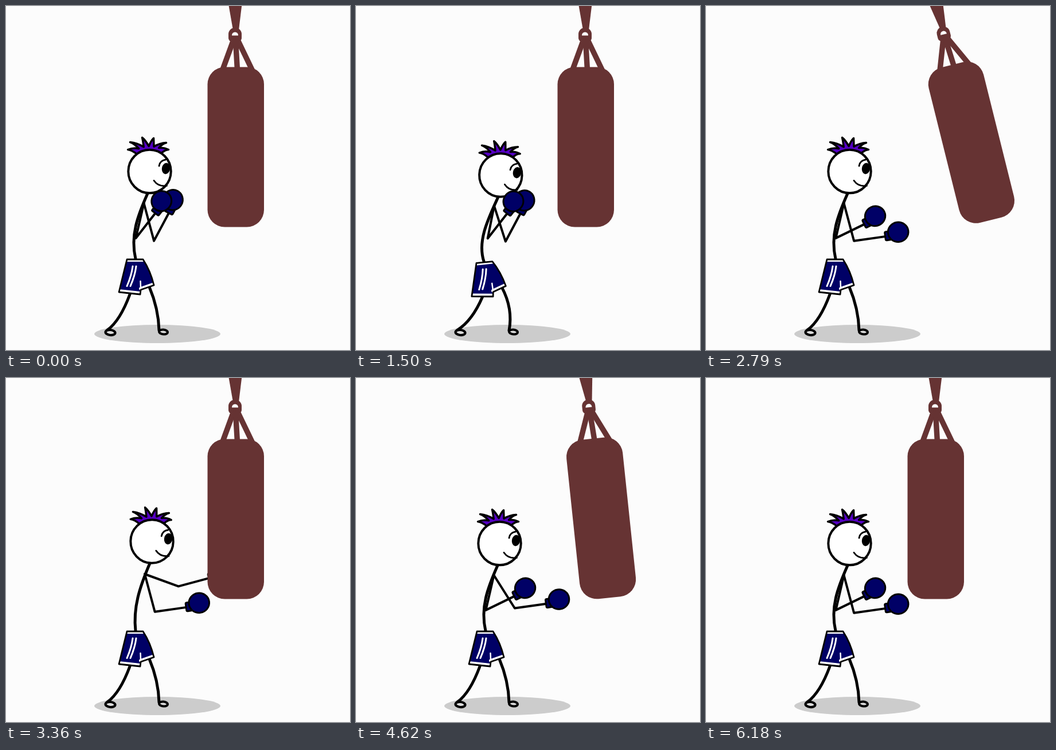
An HTML page with a canvas that plays this animation: 600x600 px, repeating every 6600 ms.

```html
<!DOCTYPE html>
<html lang="en">
<head>
<meta charset="utf-8">
<title>Punching bag</title>
<style>
html, body { margin: 0; width: 100%; height: 100%; overflow: hidden; background: #fcfcfc; }
canvas { display: block; }
</style>
</head>
<body>
<canvas id="stage" width="600" height="600"></canvas>
<script>
const ctx = document.getElementById('stage').getContext('2d');
const LOOP = 6600, STEP = 30, LAST = 205, WARMUP = 80, COMBO = 25;
const NAVY = '#000066', BAG = '#663333', PAPER = '#fcfcfc';
const RAD = Math.PI / 180;

// Angles in degrees: upper arm and forearm of each side, and the bag's swing.
const guard = { lean: 0, rear: 103, rearFore: -52, lead: 75, leadFore: -62, swing: 0 };
const open = { ...guard, rearFore: -39, leadFore: -51 };
const ready = { ...guard, rearFore: -26, leadFore: -8 };
const jab = { ...ready, lean: 1, rear: 20, rearFore: -15 };
const recoil = { ...ready, swing: 14 };
const cross = { ...ready, lead: 23, swing: 18 };

const warmup = [[0, guard], [60, guard], [70, open], [WARMUP, ready]];
const combo = [[0, ready], [6, jab], [12, recoil], [19, cross], [COMBO, ready]];

function poseAt(track, n) {
  const i = Math.max(1, track.findIndex(k => k[0] >= n));
  const [n0, a] = track[i - 1], [n1, b] = track[i];
  const pose = {};
  for (const key in a) pose[key] = a[key] + (b[key] - a[key]) * (n - n0) / (n1 - n0);
  return pose;
}

function paint(path, stroke, width, fill) {
  if (fill) { ctx.fillStyle = fill; ctx.fill(path); }
  if (stroke) { ctx.strokeStyle = stroke; ctx.lineWidth = width; ctx.stroke(path); }
}

function ellipse(x, y, rx, ry, rot = 0) {
  const p = new Path2D();
  p.ellipse(x, y, rx, ry, rot, 0, 7);
  return p;
}

function box(x, y, w, h, r) {
  const p = new Path2D();
  p.roundRect(x, y, w, h, r);
  return p;
}

function line(...v) {
  const p = new Path2D();
  for (let i = 0; i < v.length; i += 2) p.lineTo(v[i], v[i + 1]);
  return p;
}

function bend(x, y, ...rest) {
  const p = new Path2D();
  p.moveTo(x, y);
  if (rest.length > 4) p.bezierCurveTo(...rest);
  else p.quadraticCurveTo(...rest);
  return p;
}

// Runs fn with the canvas turned about (px, py) and moved by (dx, dy).
function turned(deg, px, py, dx, dy, fn) {
  ctx.save();
  ctx.translate(px + dx, py + dy);
  ctx.rotate(deg * RAD);
  ctx.translate(-px, -py);
  fn();
  ctx.restore();
}

function legs(dip) {
  paint(bend(216 + 5 * dip, 503 + 5 * dip, 199 + 4 * dip, 549, 177, 565), '#000', 5);
  paint(bend(250 + 5 * dip, 490 + dip, 266 + 9 * dip, 528, 267, 566), '#000', 5);
  paint(ellipse(182, 569.5, 8.5, 4.5, 0.1), '#000', 4.2, '#ddd');
  paint(ellipse(274.5, 568.5, 7.5, 4, 0.1), '#000', 4, '#ddd');
}

function shorts() {
  const p = bend(239, 442, 252, 462, 258, 487);
  p.lineTo(235, 495);
  p.lineTo(234, 503);
  p.lineTo(197, 499);
  p.lineTo(211, 442);
  p.closePath();
  paint(p, null, 0, NAVY);
  ctx.save();
  ctx.clip(p);
  paint(line(211, 444, 239, 444), '#fff', 4);
  paint(line(197, 497, 234, 501), '#fff', 6);
  paint(line(235, 493, 258, 485), '#fff', 6);
  ctx.restore();
  paint(line(234.5, 480, 235, 493), '#fff', 2.5);
  for (const x of [0, 6]) paint(bend(221 + x, 454, 219 + x, 470, 211 + x, 488.5), '#fff', 3);
  paint(p, '#000', 2.8);
}

function torso(dip, lean) {
  paint(bend(247 + dip + 4 * lean, 327 + 7 * dip - 4 * lean,
             230 + 3 * lean, 365 + 8 * dip,
             216.5 - 6 * dip + 5 * lean, 400 + 12 * dip,
             226 - 3 * dip, 441 + 6 * dip), '#000', 5);
}

// Spikes stand on evenly spaced roots around the skull and sweep to their tips.
function hair() {
  const tips = [[-38, -38], [-34, -51], [-13, -59], [7, -58], [29, -50], [33, -38]];
  const root = i => {
    const a = (-37 + 11.7 * i) * RAD, r = i % tips.length ? 44 : 38;
    return [r * Math.sin(a), -r * Math.cos(a)];
  };
  const p = new Path2D();
  p.moveTo(...root(0));
  tips.forEach(([tx, ty], i) => {
    const [ax, ay] = root(i), [bx, by] = root(i + 1);
    p.quadraticCurveTo((ax + tx) / 2, (ay + ty) / 2 - 3, tx, ty);
    p.quadraticCurveTo((bx + tx) / 2, (by + ty) / 2 - 3, bx, by);
  });
  p.quadraticCurveTo(-2, -42, ...root(0));
  paint(p, '#000', 3.5, '#5500c4');
}

function head() {
  hair();
  paint(ellipse(0, 0, 37.2, 37.8), '#000', 4, '#fff');
  paint(ellipse(28.5, -5, 7.2, 9.8, 0.15), null, 0, '#000');
  paint(bend(16.5, -9.5, 18, -19, 28, -20.5), '#000', 2.8);
  paint(bend(7.5, 16, 15, 27, 30, 25), '#000', 2.8);
}

function arm(x, y, length, upper, fore) {
  const ex = x + length * Math.cos(upper * RAD), ey = y + length * Math.sin(upper * RAD);
  paint(line(x, y, ex, ey, ex + 56 * Math.cos(fore * RAD), ey + 56 * Math.sin(fore * RAD)), '#000', 4);
  turned(fore, 0, 0, ex, ey, () => {
    paint(box(55, -8, 12, 15, 2), '#000', 3, NAVY);
    paint(ellipse(78.5, -4.5, 17.8, 17.2), '#000', 3, NAVY);
  });
}

function bag() {
  paint(line(383, -32, 415, -32, 406, 42, 396, 42), null, 0, BAG);
  paint(box(388, 38, 23, 24, [11, 11, 6, 6]), null, 0, BAG);
  paint(box(394, 45.5, 11, 6, [5.5, 5.5, 0, 0]), null, 0, PAPER);
  for (const side of [-1, 0, 1])
    paint(line(400.5 + 4 * side, 60, 403.5 + 26 * side, 112), BAG, 9.5);
  paint(box(351.5, 106.5, 98.5, 279, 30), null, 0, BAG);
}

function draw(ms) {
  const n = Math.min(LAST, Math.max(0, Math.floor(ms / STEP) - 1));
  const warming = n < WARMUP;
  const dip = warming ? 1 - Math.abs(1 - n % 20 / 10) : 0;
  const pose = warming ? poseAt(warmup, n) : poseAt(combo, (n - WARMUP) % COMBO);
  const lean = pose.lean;
  const sx = 240.5 + 0.5 * dip + 1.5 * lean, sy = 344 + 5 * dip - 2 * lean;

  ctx.lineCap = ctx.lineJoin = 'round';
  ctx.fillStyle = PAPER;
  ctx.fillRect(0, 0, 600, 600);
  paint(ellipse(264, 572, 110, 16), null, 0, '#ccc');
  legs(dip);
  torso(dip, lean);
  turned(-6.5 * dip, 228, 475, 2.5 * dip, 5 * dip, shorts);
  turned(1.5 * dip + lean, 0, 0, 250.5 + 2 * dip + 4 * lean, 288.5 + 7.2 * dip - 3.5 * lean, head);
  arm(sx, sy, 68 - 3 * dip, pose.lead - 3 * dip, pose.leadFore);
  arm(sx, sy, 62.5 - 5 * dip, pose.rear - 2 * dip, pose.rearFore);
  turned(-pose.swing, 399, -11, 0, 0, bag);
}

const start = performance.now();
function tick() {
  draw((performance.now() - start) % LOOP);
  requestAnimationFrame(tick);
}
tick();
</script>
</body>
</html>
```
